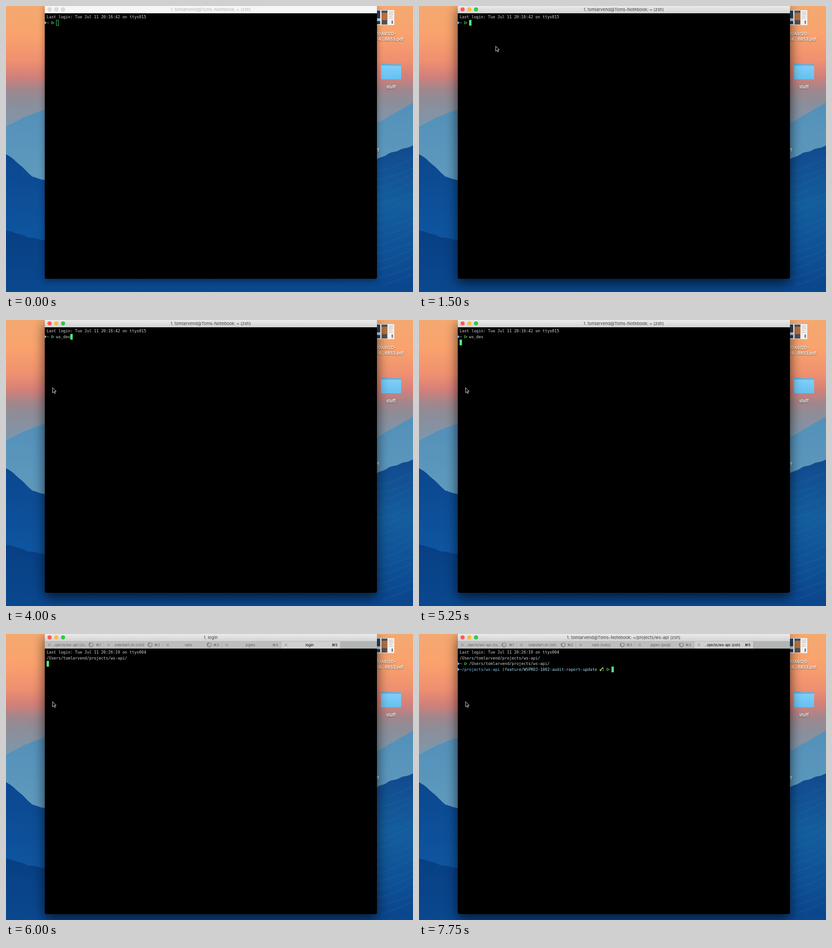
Animation of 892 by 628 pixels, one loop 8000 ms. Source, as an HTML page:

```html
<!DOCTYPE html>
<html lang="en">
<head>
<meta charset="utf-8">
<title>Terminal tabs</title>
<style>
  html, body { margin: 0; width: 100%; height: 100%; overflow: hidden; background: #0a458b; }
  svg { display: block; width: 892px; height: 628px; }
  .ui { font-family: Inter, Roboto, sans-serif; }
  .mono { font: 8.65px "DejaVu Sans Mono", "Liberation Mono", monospace; }
  .icon-label { font: 600 9.2px Inter, sans-serif; fill: #fff; filter: drop-shadow(0 1px 1px #0009); }
  .frame { filter: drop-shadow(0 4px 7px #0006); }
  .active .frame { filter: drop-shadow(0 9px 13px #000a); }
  .title { font-size: 9.4px; fill: #b3b3b3; text-anchor: middle; }
  .active .title { fill: #404040; }
  .bar { fill: #f6f6f6; }
  .active .bar { fill: url(#bar); }
  .light { fill: #dadada; stroke: #cfcfcf; stroke-width: .5; }
  .active .light { fill: var(--on); stroke: none; }
  .tab { font-size: 8px; fill: #646464; }
  .tab.front { fill: #000; }
</style>
</head>
<body>
<svg viewBox="0 0 892 628" xmlns="http://www.w3.org/2000/svg">
  <defs>
    <linearGradient id="sky" x2="0" y2="1">
      <stop offset="0" stop-color="#f3a970"/>
      <stop offset=".1" stop-color="#faa26d"/>
      <stop offset=".19" stop-color="#ef9070"/>
      <stop offset=".245" stop-color="#d48079"/>
      <stop offset=".29" stop-color="#a2868c"/>
      <stop offset=".33" stop-color="#8d8d98"/>
      <stop offset=".38" stop-color="#8493a4"/>
      <stop offset=".5" stop-color="#6da2bd"/>
    </linearGradient>
    <linearGradient id="far" x2="0" y2="1">
      <stop offset="0" stop-color="#5390b9"/>
      <stop offset="1" stop-color="#72a8c4"/>
    </linearGradient>
    <linearGradient id="near" x2="0" y2="1">
      <stop offset="0" stop-color="#0b478f"/>
      <stop offset=".6" stop-color="#0e559f"/>
      <stop offset="1" stop-color="#0c519b"/>
    </linearGradient>
    <linearGradient id="slope" x2="0" y2="1">
      <stop offset="0" stop-color="#124a8e"/>
      <stop offset=".4" stop-color="#145d9d"/>
      <stop offset=".7" stop-color="#0f5297"/>
      <stop offset="1" stop-color="#0b448c"/>
    </linearGradient>
    <linearGradient id="low" x2="0" y2="1">
      <stop offset="0" stop-color="#083f83"/>
      <stop offset="1" stop-color="#0a488f"/>
    </linearGradient>
    <linearGradient id="bar" x2="0" y2="1">
      <stop offset="0" stop-color="#ebebeb"/>
      <stop offset="1" stop-color="#d2d2d2"/>
    </linearGradient>
    <linearGradient id="folder" x2="0" y2="1">
      <stop offset="0" stop-color="#7dcff9"/>
      <stop offset="1" stop-color="#68c0ee"/>
    </linearGradient>
  </defs>

  <rect width="892" height="628" fill="url(#sky)"/>
  <g id="hills"></g>

  <g id="desktop">
    <rect x="800" y="9" width="51" height="33" fill="#f3f1ee"/>
    <path d="M813 10h7v30h-7z" fill="#26415f"/>
    <path d="M813 27h7v6h-7z" fill="#d5dade"/>
    <path d="M823 10h13v31h-13z" fill="#b9703c"/>
    <path d="M823 10h13v5h-13zM824 31h11v9h-11z" fill="#4b5260"/>
    <path d="M839 13h10M839 16h9M839 19h10M839 23h8M839 27h9" stroke="#b5b5b5"/>
    <path d="M845 32h3v7h-3z" fill="#777e88"/>
    <path d="M822 160V128q0-2 2-2h11q1.500 0 2 2h27q2 0 2 2v30q0 1-1 1h-42q-1 0-1-1z" fill="#55b5e5"/>
    <path d="M822 131h44v29q0 1-1 1h-42q-1 0-1-1z" fill="url(#folder)"/>
    <g class="icon-label" text-anchor="end">
      <text x="855" y="64">20A912D-</text>
      <text x="871" y="76">-4...6853.pdf</text>
      <text x="854" y="181">stuff</text>
      <text x="818" y="320">stuff</text>
    </g>
  </g>

  <g id="window">
    <path class="frame" id="frame" fill="#000"/>
    <rect class="bar" x="85" width="728" height="16"/>
    <circle class="light" cx="95.500" cy="7.500" r="4.600" style="--on:#fc5b57"/>
    <circle class="light" cx="110.300" cy="7.500" r="4.600" style="--on:#fdb940"/>
    <circle class="light" cx="125" cy="7.500" r="4.600" style="--on:#33c748"/>
    <text class="ui title" id="title" x="448.500" y="11"></text>
    <g class="ui" id="tabs"></g>
    <g class="mono" id="screen"></g>
  </g>
  <path id="pointer" d="M0 0V11.300L2.700 8.900L4.400 12.800L6.300 12L4.600 8.200H8Z" fill="#000" stroke="#fff" stroke-width=".9"/>
</svg>

<script>
const LOOP = 8000, STEP = 250, COL = 5.2, ROW = 12.5, LEFT = 89, TAB = 129.6;
const $ = id => document.getElementById(id);

const USER = 'tomlarvend';
const PATH = `/Users/${USER}/projects/ws-api/`;
const HOME_TITLE = `1. ${USER}@Toms-Notebook: ~ (zsh)`;
const COMMAND = 'ws_dev';

// Last entry whose time has passed
const at = (track, t) => track.filter(([start]) => start <= t).pop()[1];

const pointerTrack = [
  [0, [556, -12]], [500, [211, 129]], [750, [169, 93]],
  [1000, [170, 88]], [1250, [168, 88]], [1750, [102, 148.5]]
];
const typedTrack = [[0, 0], [2500, 2], [3250, 3], [3500, 4], [3750, 5], [4000, 6]];
const titleTrack = [
  [0, HOME_TITLE],
  [5500, `1. osascript ~/.dotfiles/iterm_scripts/${COMMAND}.scpt (zsh)`],
  [5750, '1. Shell'], [6000, '1. login'], [6750, HOME_TITLE],
  [7000, `1. ${USER}@Toms-Notebook: ~/projects/ws-api (zsh)`]
];
// A leading asterisk marks a tab with a busy spinner
const tabTrack = [
  [0, []],
  [5500, [`${COMMAND} (zsh)`, 'Shell']],
  [5750, ['osascript (zsh)', 'login', 'login', 'Shell', 'Shell']],
  [6000, ['*..ojects/ws-api (zs...', '*sidestart.sh (zsh)', '*rails', 'pgws', 'login']],
  [6250, ['*..ojects/ws-api (zs...', '*sidestart.sh (zsh)', '*rails (zsh)', 'pgws', 'login']],
  [6500, ['*..ojects/ws-api (zs...', '*sidestart.sh (zsh)', '*rails (zsh)', '*pgws', 'login']],
  [6750, ['*..ojects/ws-api (zs...', '*sidestart.sh (zsh)', '*rails (zsh)', 'pgws', `/Users/${USER}/p...`]],
  [7000, ['*..ojects/ws-api (zs...', '*sidestart.sh (sh)', '*rails (ruby)', '*pgws (psql)', '..ojects/ws-api (zsh)']]
];

function hill(points, fill, rough) {
  let d = '';
  for (let i = 1; i < points.length; i++) {
    const [x0, y0] = points[i - 1], [x1, y1] = points[i];
    for (let x = x0; x <= x1; x += 2) {
      const jitter = rough * (Math.sin(x * 1.7) + Math.sin(x * 2.9 + 1));
      d += `L${x} ${(y0 + (y1 - y0) * (x - x0) / (x1 - x0) + jitter).toFixed(1)}`;
    }
  }
  const start = points[0][0], end = points[points.length - 1][0];
  return `<path d="M${start} 628${d}L${end} 628Z" fill="${fill}"/>`;
}

function drawHills() {
  let strokes = '';
  for (let i = 0; i < 15; i++) {
    const y = 350 + i * 18;
    strokes += `M812 ${y + 14}Q850 ${y + 6} 893 ${y - 16 + 5 * Math.sin(i * 2)}`;
  }
  $('hills').innerHTML =
    hill([[0, 265], [40, 244], [90, 225]], 'url(#far)', .2) +
    hill([[806, 262], [840, 242], [894, 211]], 'url(#far)', .2) +
    hill([[0, 325], [16, 336], [36, 354], [58, 375], [90, 384], [450, 470], [808, 560]], 'url(#near)', .4) +
    hill([[700, 380], [812, 337], [842, 323], [894, 306]], 'url(#slope)', .7) +
    `<path d="${strokes}" fill="none" stroke="#2278a6" stroke-width="3" opacity=".16"/>` +
    hill([[0, 493], [24, 499], [46, 507], [90, 515], [400, 570], [894, 620]], 'url(#low)', .6);
}

const rowY = (top, row) => top + 8.3 + ROW * row;

function mono(top, row, col, text, fill = '#d4d4d4') {
  return `<text x="${LEFT + col * COL}" y="${rowY(top, row) + 2.9}" fill="${fill}">${text}</text>`;
}

function cursor(top, row, col, solid = true, color = '#4ef57d') {
  const x = LEFT + col * COL, y = rowY(top, row) - 6.2;
  return solid
    ? `<rect x="${x}" y="${y}" width="${COL}" height="12.500" fill="${color}"/>`
    : `<rect x="${x + .6}" y="${y + .5}" width="4.700" height="11.700" fill="none" stroke="#3fd66b"/>`;
}

function prompt(top, row, col, path = '~') {
  const y = rowY(top, row), x = LEFT + col * COL;
  return `<path d="M85 ${y - 3.5}L88.800 ${y}L85 ${y + 3.5}Z" fill="#72c5f2"/>` +
    mono(top, row, 0, path, '#7ccbf2') +
    `<path d="M${x + .6} ${y - 2.8}L${x + 5.8} ${y}L${x + .6} ${y + 2.8}Z" fill="none" stroke="#58e85b"/>`;
}

function spinner(x, t) {
  const lead = Math.floor(t / STEP) * 5;
  let out = '';
  for (let i = 0; i < 12; i++) {
    const shade = .3 + .7 * ((i - lead % 12 + 12) % 12) / 11;
    out += `<path d="M0-3V-5.700" stroke="#333" stroke-width="1" opacity="${shade}" transform="translate(${x} 23.800) rotate(${i * 30})"/>`;
  }
  return out;
}

function drawTabs(labels, t) {
  if (!labels.length) return '';
  let out = '<path d="M85 16h728v16h-728z" fill="#b3b5b5"/>';
  labels.forEach((label, i) => {
    const x = 85 + i * TAB, front = i === labels.length - 1, busy = label[0] === '*';
    out += `<rect x="${x}" y="16" width="${TAB}" height="16" fill="${front ? '#d0d0d0' : '#bebebe'}"/>
      <path d="M${x + TAB} 16v16" stroke="#a5a5a5" stroke-width=".8"/>
      <path d="M${x + 7} 21l6 6m0-6l-6 6" stroke="#777" stroke-width=".9"/>
      <g class="tab${front ? ' front' : ''}">
        <text x="${x + (busy ? 55.7 : 62)}" y="26.700" text-anchor="middle">${label.replace('*', '')}</text>
        <text x="${x + 123}" y="26.700" text-anchor="end">⌘${i + 1}</text>
      </g>`;
    if (busy) out += spinner(x + 101.5, t);
  });
  return out + '<path d="M85 16.300h728" stroke="#a9a9a9" stroke-width=".6"/>';
}

function drawScreen(t) {
  if (t < 5500) {
    const typed = at(typedTrack, t), entered = t >= 5250;
    return mono(16, 0, 0, 'Last login: Tue Jul 11 20:16:42 on ttys015') +
      prompt(16, 1, 2) + mono(16, 1, 4, COMMAND.slice(0, typed)) +
      (entered ? cursor(16, 2, 0) : cursor(16, 1, 4 + typed, t >= 1500));
  }
  if (t < 6000) return cursor(32, 0, 0);
  let out = mono(32, 0, 0, 'Last login: Tue Jul 11 20:26:19 on ttys004') + mono(32, 1, 0, PATH);
  if (t < 6750) return out + cursor(32, 2, 0);
  out += prompt(32, 2, 2) + mono(32, 2, 4, PATH);
  if (t < 7000) return out + cursor(32, 3, 0);
  return out + prompt(32, 3, 62, '~/projects/ws-api') +
    mono(32, 3, 18, '(feature/WSPROJ-1002-audit-report-update', '#a9e2f3') +
    '<path d="M396 78l2 2.500q2-5 6-7" fill="none" stroke="#b8e85a" stroke-width="1.700"/>' +
    mono(32, 3, 60, ')', '#a9e2f3') +
    cursor(32, 3, 64, true, t < 7500 ? '#4ef57d' : '#58dc8b');
}

function render(t) {
  const bottom = t < 5500 ? 599 : 615;
  $('window').setAttribute('class', t < 1500 ? '' : 'active');
  $('frame').setAttribute('d', `M85 0H813V${bottom - 4}q0 4-4 4H89q-4 0-4-4Z`);
  $('title').textContent = at(titleTrack, t);
  $('tabs').innerHTML = drawTabs(at(tabTrack, t), t);
  $('screen').innerHTML = drawScreen(t);
  $('pointer').setAttribute('transform', `translate(${at(pointerTrack, t)})`);
}

let shown = -1;
function tick() {
  const step = Math.floor(performance.now() % LOOP / STEP);
  if (step !== shown) render((shown = step) * STEP);
  requestAnimationFrame(tick);
}

drawHills();
tick();
</script>
</body>
</html>
```
